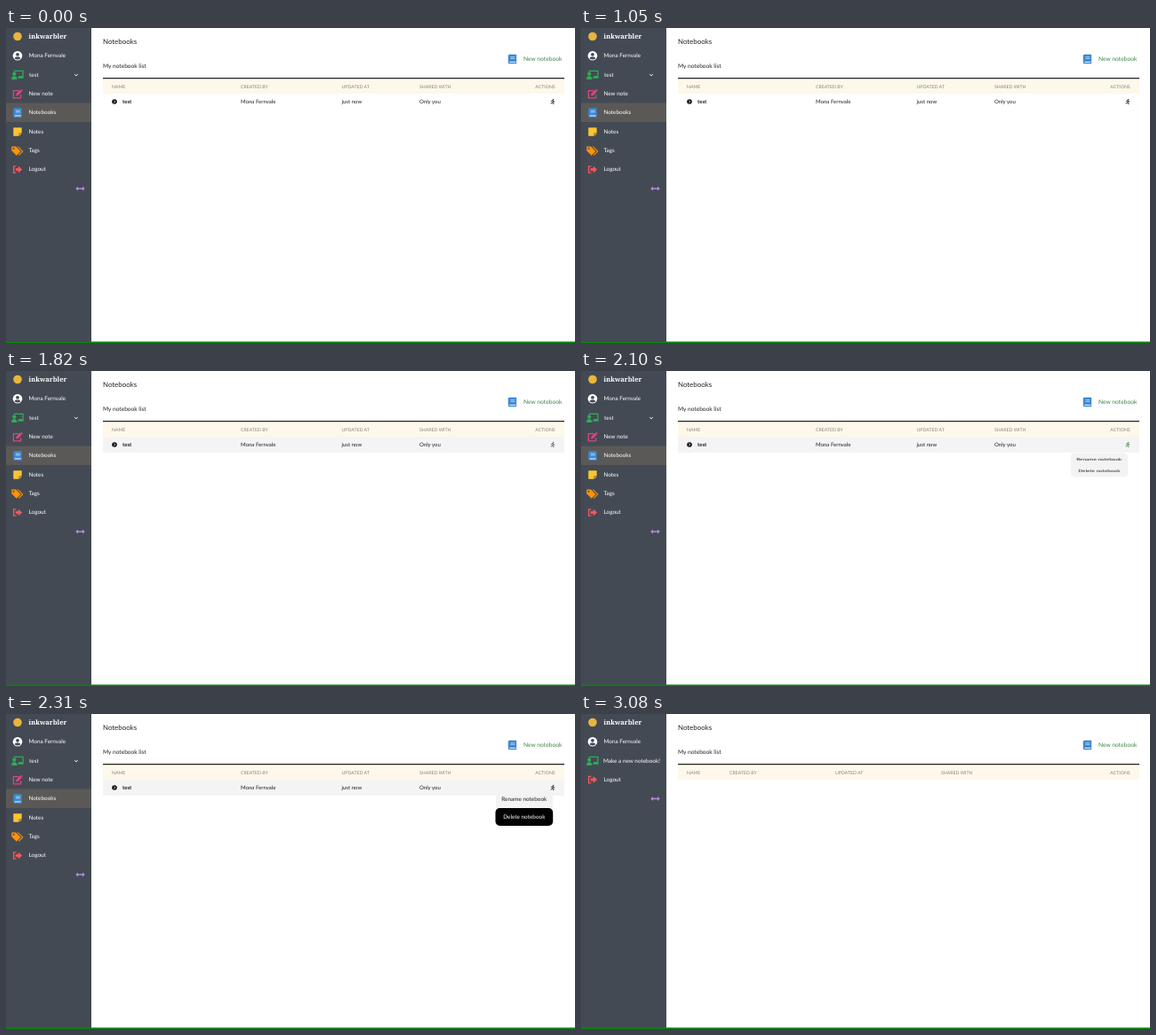
Recreate the animation shown at these times as an HTML page. Size 640x355 px, loop 3.15 s.

```html
<!DOCTYPE html>
<html lang="en">
<head>
<meta charset="utf-8">
<title>Notebooks</title>
<style>
  html, body { margin: 0; width: 100%; height: 100%; overflow: hidden; background: #fff; }
  svg { display: block; width: 100%; height: 100%; }
  text { font-family: Lato, "Open Sans", sans-serif; font-size: 6.4px; fill: #222; text-rendering: geometricPrecision; }
  .side text { fill: #fff; }
  .side .brand { font: bold 7.5px "Noto Serif", serif; }
  .head text { font-size: 5.2px; fill: #8b837a; }
  .row text { font-size: 6.05px; }
  .end { text-anchor: end; }
  .mid { text-anchor: middle; }
</style>
</head>
<body>
<svg viewBox="0 0 640 355">
  <defs>
    <!-- icons are centred on 0,0 -->
    <g id="user">
      <circle r="5.3" fill="#fff"/>
      <circle cy="-1.5" r="1.9" fill="#434a54"/>
      <path d="M-3.3 3.1Q-3 1.1-1.2 1.1H1.2Q3 1.1 3.3 3.1Q0 5.4-3.3 3.1Z" fill="#434a54"/>
    </g>
    <g id="teacher" fill="#2fad56">
      <circle cx="-3.7" cy="-1.1" r="2.1"/>
      <path d="M-6.7 5.3V4.2Q-6.7 1.5-4 1.5H-3.4Q-.7 1.5-.7 4.2V5.3Z"/>
      <path d="M-3.7-3.5V-4.5H6V3.2H.3M2 3V1.8H4.5V3" fill="none" stroke="#2fad56" stroke-width="1.3"/>
    </g>
    <g id="edit">
      <path d="M1.6-3.6H-4.6V4.6H3.6V1" fill="none" stroke="#d9487c" stroke-width="1.3" stroke-linejoin="round"/>
      <path d="M-1.8 2.2L-1.5-.2 3-4.7 5-2.7.6 1.8ZM3.5-5.2L4.2-5.8 6-4 5.4-3.2Z" fill="#d9487c"/>
    </g>
    <g id="book">
      <path d="M-3.2-5.2H4.7V5.2H-3.2Q-4.7 5.2-4.7 3.7V-3.7Q-4.7-5.2-3.2-5.2Z" fill="#3d88d2"/>
      <path d="M-2.1-2.3H2.8M-2.1-.6H2.8" stroke="#dcecfa" stroke-width=".7"/>
      <path d="M-3.3 3.4H3.8" stroke="#dcecfa" stroke-width="1.1"/>
    </g>
    <path id="note" d="M-4.7-4.7H4.7V1.6H1.6V4.7H-4.7ZM2.3 2.3H4.6L2.3 4.6Z" fill="#fbc531"/>
    <g id="tags" fill="#ff920a">
      <path d="M-6.7-4.8H-1.8L3.6.6-1.2 5.4-6.7 0Z"/>
      <path d="M-.3-4.8H1L6.5.6 1.7 5.4.9 4.7 5 .6Z"/>
      <circle cx="-4.4" cy="-2.5" r="1" fill="#434a54"/>
    </g>
    <g id="exit" fill="#f0585a">
      <path d="M-1.5-3.6H-4.3V3.6H-1.5" fill="none" stroke="#f0585a" stroke-width="1.4"/>
      <path d="M-2.2-1.4H.8V-4L5.2 0 .8 4V1.4H-2.2Z"/>
    </g>
    <path id="arrows" d="M-5.3 0L-2.5-2.6V-.8H2.5V-2.6L5.3 0 2.5 2.6V.8H-2.5V2.6Z" fill="#b48ae0"/>
    <g id="runner" fill="none" stroke="currentColor" stroke-width=".8" stroke-linecap="round">
      <circle cx=".5" cy="-2.4" r=".4" fill="currentColor" stroke-width=".4"/>
      <path d="M-1.7-.3L-1-1.3 .5-1.1-.3.6 1 1.4.8 2.8M-.4.9L-.9 1.9H-2M.6-1L1.1 0H1.9"/>
    </g>
  </defs>

  <rect width="96" height="354" fill="#434a54"/>
  <g class="side">
    <circle cx="13" cy="9.5" r="4.8" fill="#e9b53c"/>
    <text class="brand" x="25.5" y="11.7">inkwarbler</text>
    <use href="#user" x="13" y="31.3"/>
    <text x="25.5" y="33.1">Mona Fernvale</text>
    <use href="#teacher" x="13" y="52.8"/>
    <g id="full">
      <rect y="84.5" width="96" height="21.5" fill="#5a5958"/>
      <text x="26" y="54.8">test</text>
      <path d="M77.2 52.1L79 53.8 80.8 52.1" fill="none" stroke="#fff"/>
      <use href="#edit" x="13" y="74.3"/><text x="25.5" y="75.7">New note</text>
      <use href="#book" x="13" y="95.5"/><text x="25.5" y="97.2">Notebooks</text>
      <use href="#note" x="13" y="117"/><text x="25.5" y="118.8">Notes</text>
      <use href="#tags" x="13" y="138.3"/><text x="25.5" y="140">Tags</text>
    </g>
    <text id="make" x="25" y="54.8">Make a new notebook!</text>
    <g id="foot">
      <use href="#exit" x="13" y="159.5"/><text x="25.5" y="161.3">Logout</text>
      <use href="#arrows" x="83.5" y="181"/>
    </g>
  </g>

  <text x="109" y="17.8" style="font-size:7.9px">Notebooks</text>
  <text x="109" y="44.9" style="font-size:6.6px">My notebook list</text>
  <use href="#book" x="569.5" y="35"/>
  <text x="582" y="37.2" style="font-size:6.7px;fill:#3c8648">New notebook</text>

  <rect x="109" y="56" width="519" height="1.5" fill="#222"/>
  <rect x="109" y="57.5" width="519" height="16.5" fill="#fef8ea"/>
  <g class="head">
    <text x="119" y="67.6">NAME</text>
    <text class="col" y="67.6">CREATED BY</text>
    <text class="col" y="67.6">UPDATED AT</text>
    <text class="col" y="67.6">SHARED WITH</text>
    <text class="end" x="617.7" y="67.6">ACTIONS</text>
  </g>

  <g id="row" class="row">
    <rect id="hover" x="109" y="74" width="519" height="18" fill="#f4f4f4"/>
    <circle cx="122" cy="83" r="2.8" fill="#111"/>
    <path d="M121.4 81.6L122.8 83 121.4 84.4" fill="none" stroke="#fff" stroke-width=".8"/>
    <text x="131" y="85.1" font-weight="bold">test</text>
    <text x="264" y="85.1">Mona Fernvale</text>
    <text x="377.5" y="85.1">just now</text>
    <text x="465" y="85.1">Only you</text>
    <use id="run" href="#runner" x="615" y="83"/>
  </g>

  <g id="menu">
    <rect x="551" y="86" width="64" height="40" rx="5" fill="#f3f3f3"/>
    <text class="mid" x="582.8" y="98.3">Rename notebook</text>
    <rect id="button" x="550.5" y="106" width="64.7" height="20" rx="5"/>
    <rect id="ring" x="550.7" y="106.2" width="64.3" height="19.6" rx="3" fill="none" stroke="#6f9fdc" stroke-width="1.2"/>
    <text id="del" class="mid" x="582.8" y="118.3">Delete notebook</text>
  </g>

  <rect y="353.4" width="640" height="1.6" fill="#0b830f"/>
</svg>
<script>
  const LOOP = 3150, STEP = 70;
  const $ = id => document.getElementById(id);
  const cols = document.querySelectorAll(".col");
  const clamp = v => Math.max(0, Math.min(1, v));
  const show = (id, on) => $(id).style.display = on ? "" : "none";

  function draw(ms) {
    const t = Math.floor(ms % LOOP / STEP) * STEP;
    const gone = t >= 3080;
    show("full", !gone);
    show("row", !gone);
    show("make", gone);
    $("foot").setAttribute("transform", `translate(0 ${gone ? -85.5 : 0})`);
    const xs = gone ? [167, 286, 405] : [264, 377.5, 465];
    cols.forEach((c, i) => c.setAttribute("x", xs[i]));

    show("hover", t >= 1750);
    $("run").style.color = t >= 2030 && t < 2240 ? "#3c8648" : t >= 1750 && t < 2030 ? "#555" : "#111";

    // the menu unfolds vertically about its middle
    const open = 1 - (1 - clamp((t - 1995) / 245)) ** 2;
    show("menu", open > 0 && !gone);
    $("menu").setAttribute("transform", `translate(0 ${106 * (1 - open)}) scale(1 ${open})`);

    const dark = clamp((t - 2170) / 140);
    $("button").style.opacity = dark;
    $("del").style.fill = dark ? "#fff" : "#222";
    show("ring", t >= 2730);
  }

  const start = performance.now();
  function tick() {
    draw(performance.now() - start);
    requestAnimationFrame(tick);
  }
  tick();
</script>
</body>
</html>
```
